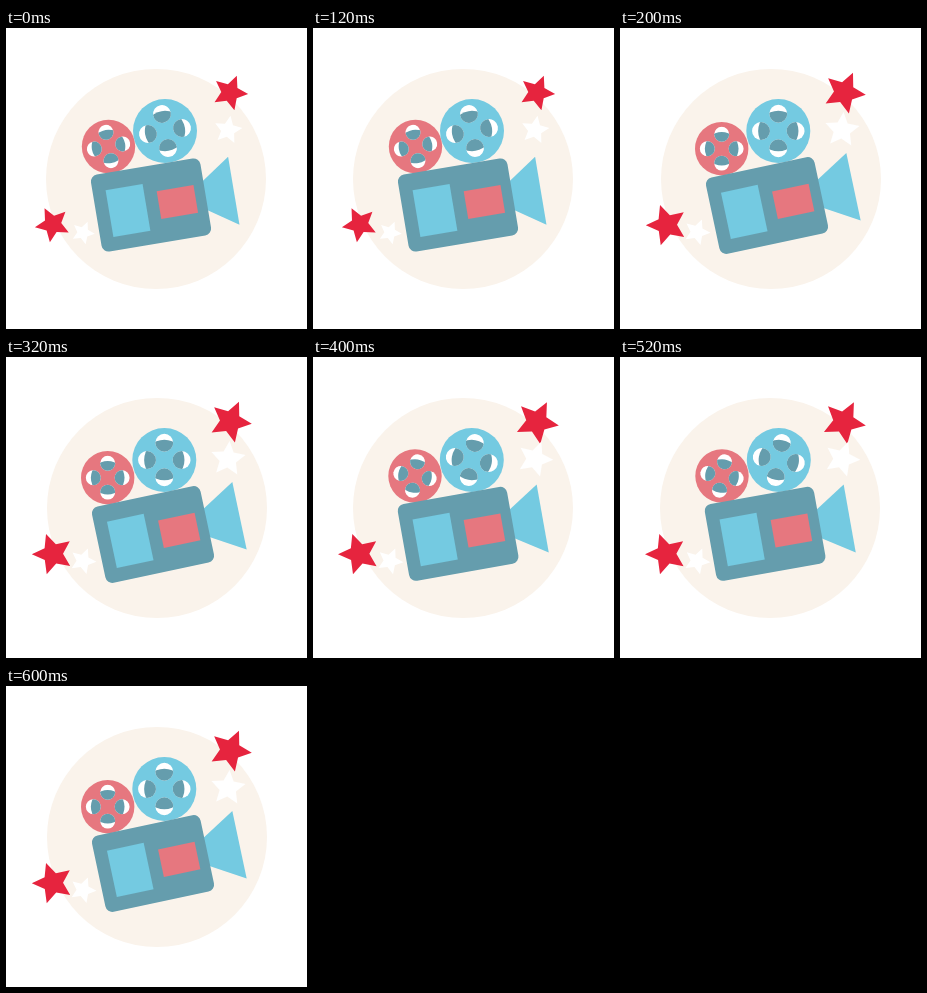
An HTML page with a canvas for the animation above (0.8 s loop, 301 by 301 pixels).

```html
<!DOCTYPE html>
<html lang="en">
<head>
<meta charset="utf-8">
<title>Film camera</title>
<style>
  html, body { margin: 0; width: 100%; height: 100%; overflow: hidden; background: #fff; }
  canvas { display: block; width: 301px; height: 301px; }
</style>
</head>
<body>
<canvas id="stage"></canvas>
<script>
const SIZE = 301, STEP = 200;
const CREAM = '#faf3eb', TEAL = '#659dad', CYAN = '#74cae1',
      PINK = '#e6777f', RED = '#e6243e', WHITE = '#fff';

const canvas = document.getElementById('stage');
const ctx = canvas.getContext('2d');
const dpr = window.devicePixelRatio || 1;
canvas.width = canvas.height = Math.round(SIZE * dpr);
ctx.scale(dpr, dpr);

const rad = deg => deg * Math.PI / 180;

// body: x, y, tilt; lens: reach; reels: x, y, turn; stars: x, y, radius, angle
const left = {
  disc: 150, body: [145, 177, -9.5], lens: 84,
  pink: [102.5, 118.5, -10], blue: [159, 103, -10],
  stars: [[224, 64.7, 18.2, 4], [222, 102, 14.5, -80], [46.7, 196.4, 18, -117], [77, 204.7, 11.8, -67]]
};
const middle = {
  disc: 151, body: [147, 177.5, -12], lens: 88.5,
  pink: [101.7, 120.7, 0], blue: [158.3, 103, 0],
  stars: [[224.3, 64.5, 21.6, 5.7], [222, 102, 18, -85], [46.9, 197, 21.1, -109], [77, 204, 13.5, -69]]
};
const right = {
  disc: 150, body: [145.1, 176.8, -10.1], lens: 86,
  pink: [102, 119, 10], blue: [158.8, 103, 10],
  stars: [[223.8, 65, 22.3, 9], [222, 102, 18.3, -70], [46.2, 197, 21.2, -109], [77, 204, 13.5, -67]]
};
const poses = [left, middle, right, middle];

function circle(x, y, r, color) {
  ctx.fillStyle = color;
  ctx.beginPath();
  ctx.arc(x, y, r, 0, Math.PI * 2);
  ctx.fill();
}

function polygon(points, color) {
  ctx.fillStyle = color;
  ctx.beginPath();
  for (const [x, y] of points) ctx.lineTo(x, y);
  ctx.fill();
}

function rect(cx, cy, w, h, color) {
  ctx.fillStyle = color;
  ctx.fillRect(cx - w / 2, cy - h / 2, w, h);
}

function placed(x, y, deg, draw) {
  ctx.save();
  ctx.translate(x, y);
  ctx.rotate(rad(deg));
  draw();
  ctx.restore();
}

function star([x, y, r, deg], color) {
  const points = [];
  for (let i = 0; i < 10; i++) {
    const a = rad(deg + i * 36), d = i % 2 ? r * 0.48 : r;
    points.push([x + d * Math.cos(a), y + d * Math.sin(a)]);
  }
  polygon(points, color);
}

// Each hole is white at the rim and teal towards the hub.
function reel([x, y, turn], r, color) {
  circle(x, y, r, color);
  for (let i = 0; i < 4; i++) {
    placed(x, y, turn + i * 90, () => {
      ctx.beginPath();
      ctx.arc(r * 0.54, 0, r * 0.28, 0, Math.PI * 2);
      ctx.clip();
      circle(r * 0.54, 0, r * 0.3, WHITE);
      circle(0, 0, r * 0.63, TEAL);
    });
  }
}

function camera(pose) {
  reel(pose.pink, 26.7, PINK);
  reel(pose.blue, 32, CYAN);
  placed(...pose.body, () => {
    const tip = pose.lens;
    polygon([[52, -13], [tip, -34.8], [tip, 34.2], [52, 12.5]], CYAN);
    ctx.fillStyle = TEAL;
    ctx.beginPath();
    ctx.roundRect(-55.5, -39, 111, 78, 7);
    ctx.fill();
    rect(-23.6, 1.6, 37.5, 47.5, CYAN);
    rect(26.5, 1.4, 37.3, 28, PINK);
  });
}

function render(time) {
  const pose = poses[Math.floor(time / STEP) % poses.length];
  ctx.fillStyle = WHITE;
  ctx.fillRect(0, 0, SIZE, SIZE);
  circle(pose.disc, 151, 110, CREAM);
  camera(pose);
  pose.stars.forEach((s, i) => star(s, i % 2 ? WHITE : RED));
}

const start = performance.now();
function tick() {
  render(performance.now() - start);
  requestAnimationFrame(tick);
}
tick();
</script>
</body>
</html>
```
